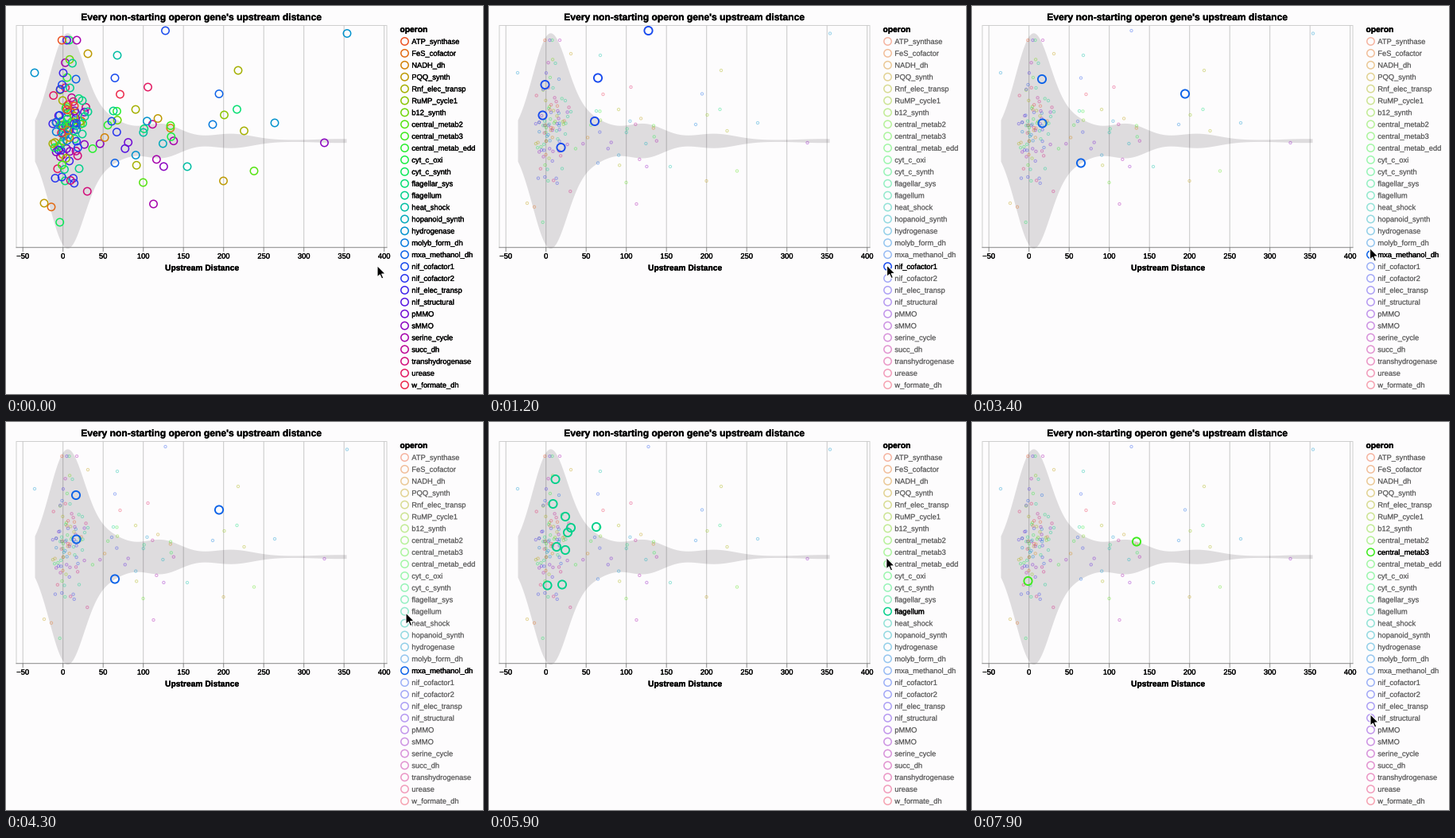
A matplotlib script for the animation above (8000 ms loop, 600 by 488 pixels).

```python
import numpy as np
import matplotlib.pyplot as plt
from matplotlib.animation import FuncAnimation
from matplotlib.patches import Polygon
from matplotlib.patheffects import withStroke

W, H, DPI = 600, 488, 100
STEP, FRAMES = 100, 80
PX = 72 / DPI  # one pixel in points
BG = "#fdfcfd"
LEFT, RIGHT, TOP, BOTTOM = 13, 479, 24.5, 303.7

OPERONS = """ATP_synthase FeS_cofactor NADH_dh PQQ_synth Rnf_elec_transp
RuMP_cycle1 b12_synth central_metab2 central_metab3 central_metab_edd cyt_c_oxi
cyt_c_synth flagellar_sys flagellum heat_shock hopanoid_synth hydrogenase
molyb_form_dh mxa_methanol_dh nif_cofactor1 nif_cofactor2 nif_elec_transp
nif_structural pMMO sMMO serine_cycle succ_dh transhydrogenase urease
w_formate_dh""".split()
N = len(OPERONS)

# Operons in the order they are clicked: (ms, genes)
PICKS = {
    "nif_cofactor1": (900, [(200.5, 31), (137, 90.5), (70.5, 99),
                            (67.5, 137.5), (133, 145), (90.5, 178)]),
    "mxa_methanol_dh": (2900, [(88, 92), (88.5, 147.5), (268, 110.5),
                               (137, 197.5)]),
    "flagellum": (4500, [(83.5, 72), (80.5, 103), (96, 119), (103, 133),
                         (135, 132), (99, 139), (85, 157), (96, 161),
                         (73.5, 205.5), (92, 204.5)]),
    "central_metab3": (6400, [(207, 150.5), (70.5, 200)]),
}

# Lone genes far from the cluster
LONE = {
    "hydrogenase": [(429, 34.5), (338, 147), (36, 84)],
    "sMMO": [(400.5, 172)],
    "Rnf_elec_transp": [(292, 81), (299.5, 157)],
    "flagellar_sys": [(290.5, 130)],
    "RuMP_cycle1": [(274.5, 137)],
    "molyb_form_dh": [(260, 149)],
    "central_metab2": [(312, 207.5), (172.5, 222)],
    "PQQ_synth": [(273.5, 220), (103, 60), (48, 248)],
    "serine_cycle": [(185.5, 249)],
    "urease": [(178.5, 102)],
    "heat_shock": [(140, 62), (228, 202)],
}

# Violin as a sum of bumps: centre, width, height
BUMPS = [(76, 22, 130), (125, 26, 25), (195, 26, 20), (283, 27, 8), (418, 25, 1.5)]
MID = 169.2

# Pointer tip: ms, x, y
PATH = [(0, 467, 326.5), (400, 500, 324.5), (600, 500.5, 326),
        (1700, 500.5, 326), (2900, 500.5, 304.5), (3400, 500.5, 304.5),
        (4300, 503, 240), (5100, 506, 222), (6000, 499, 164),
        (6900, 499, 164), (7400, 510, 235), (7900, 501, 367.5)]
ARROW = np.array([(0, 0), (0, 14.5), (3.3, 11.5), (5.6, 16.6),
                  (7.9, 15.6), (5.7, 10.6), (10.3, 10.4)])

plt.rcParams["font.family"] = "Liberation Sans"
plt.rcParams["text.hinting"] = "none"


def sinebow(t):
    x = np.pi * (0.5 - t)
    rgb = np.sin(x + np.arange(3) * np.pi / 3) ** 2
    return 0.94 * rgb ** [1.4, 1.0, 1.1]


def ring_size(r):
    return (2 * r * PX) ** 2


def rgba(colors, alpha):
    return np.column_stack([colors, alpha])


def label(x, y, s, px, **kw):
    heavier = [withStroke(linewidth=0.3 * PX, foreground="black")]
    return ax.text(x, y, s, fontsize=px * PX, va="baseline", color="black",
                   path_effects=heavier, **kw)


def line(xs, ys, color, z=1):
    ax.plot(xs, ys, color=color, lw=PX, zorder=z, snap=False)


def rings(x, y, colors):
    return ax.scatter(x, y, s=ring_size(4.7), facecolors="none",
                      edgecolors=colors, linewidths=1.5 * PX, zorder=4)


def gene_table():
    rng = np.random.default_rng(4)
    others = [i for i, name in enumerate(OPERONS) if name not in PICKS]
    near, mid = 92, 24
    xs = np.append(np.clip(rng.normal(78, 10, near), 57, 104),
                   rng.uniform(108, 218, mid))
    ys = np.append(np.clip(150 + 30 * rng.standard_t(5, near), 43, 272),
                   rng.normal(166, 22, mid))
    rows = list(zip(xs, ys, rng.choice(others, near + mid)))
    known = dict(LONE, **{name: genes for name, (_, genes) in PICKS.items()})
    rows += [(x, y, OPERONS.index(name))
             for name, genes in known.items() for x, y in genes]
    return np.array(rows).T


def draw_violin():
    x = np.arange(36, 429)
    h = 1 + sum(a * np.exp(-((x - c) / s) ** 2 / 2) for c, s, a in BUMPS)
    ax.fill_between(x, MID - h, MID + h, color="#0c000c", alpha=0.125,
                    linewidth=0, zorder=2)


def draw_axes():
    line([LEFT, LEFT, RIGHT, RIGHT], [BOTTOM, TOP, TOP, BOTTOM], "#cfcfcf")
    for k in range(10):
        x = 21.2 + 50.5 * k
        line([x, x], [TOP, BOTTOM], "#c8c8c8")
        line([x, x], [BOTTOM, BOTTOM + 4.7], "#888888", 3)
        value = str(50 * (k - 1)).replace("-", "\u2212")
        label(x, 317.6, value, 9.35, ha="center")
    line([LEFT, RIGHT], [BOTTOM, BOTTOM], "#888888", 3)
    label(246, 18, "Every non-starting operon gene's upstream distance",
          12.1, ha="center", weight="bold")
    label(246.5, 332.6, "Upstream Distance", 10.28, ha="center", weight="bold")
    label(495.5, 32.8, "operon", 10.28, weight="bold")


fig = plt.figure(figsize=(W / DPI, H / DPI), dpi=DPI, facecolor=BG)
ax = fig.add_axes([0, 0, 1, 1])
ax.set(xlim=(0, W), ylim=(H, 0))
ax.axis("off")
draw_axes()
draw_violin()

palette = np.array([sinebow((i + 1) / (N + 1)) for i in range(N)])
gene_x, gene_y, gene_op = gene_table()
gene_op = gene_op.astype(int)
genes = rings(gene_x, gene_y, palette[gene_op])

row_y = 44.5 + 14.9 * np.arange(N)
keys = rings(np.full(N, 501.5), row_y, palette)
names = [label(510.3, y + 3.3, s, 9.35) for y, s in zip(row_y, OPERONS)]

pointer = Polygon(ARROW, closed=True, facecolor="black", edgecolor="white",
                  linewidth=1.1 * PX, joinstyle="round", zorder=6)
ax.add_patch(pointer)


def show_pick(pick):
    if pick is None:
        lit = np.ones(N, bool)
        radius, width = 4.7, 1.5
    else:
        lit = np.arange(N) == pick
        radius, width = 5.1, 1.9
    on = lit[gene_op]
    genes.set_sizes(np.where(on, ring_size(radius), ring_size(1.6)))
    genes.set_linewidths(np.where(on, width, 1.1) * PX)
    genes.set_edgecolors(rgba(palette[gene_op], np.where(on, 1, 0.36)))
    keys.set_edgecolors(rgba(palette, np.where(lit, 1, 0.42)))
    for text, bright in zip(names, lit):
        text.set_alpha(1 if bright else 0.38)


def update(i):
    t = i * STEP
    pick = None
    for name, (start, _) in PICKS.items():
        if t >= start:
            pick = OPERONS.index(name)
    show_pick(pick)
    times, xs, ys = np.transpose(PATH)
    pointer.set_xy(ARROW + [np.interp(t, times, xs), np.interp(t, times, ys)])
    return genes, keys, pointer, *names


anim = FuncAnimation(fig, update, frames=FRAMES, interval=STEP,
                     repeat=True, repeat_delay=0, blit=False)
plt.show()
```
